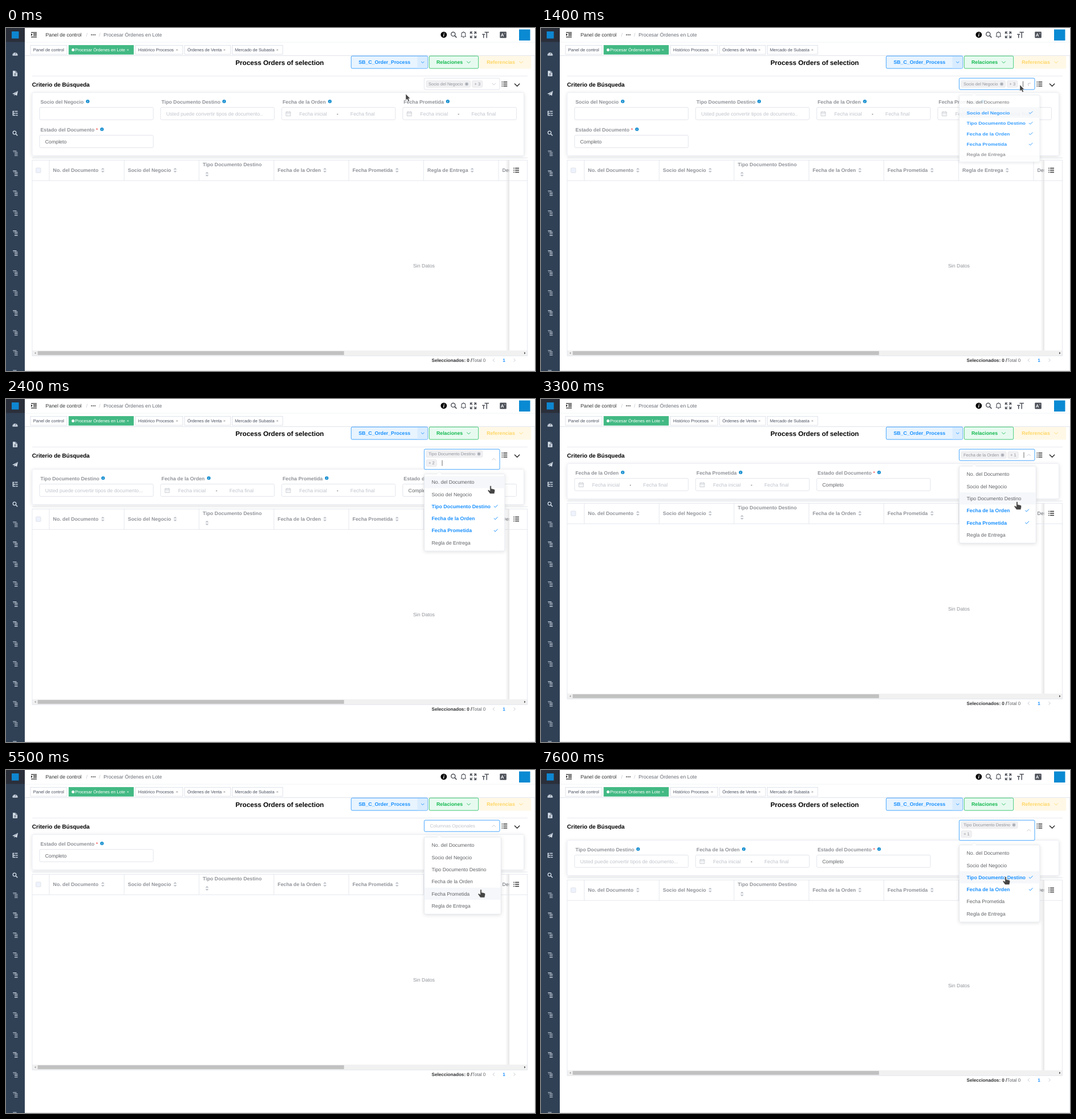
Animation of 929 by 603 pixels, one loop 8 s. Source, as an HTML page:

```html
<!DOCTYPE html>
<html lang="es">
<head>
<meta charset="utf-8">
<title>Procesar Órdenes en Lote</title>
<style>
html, body { margin: 0; width: 100%; height: 100%; overflow: hidden; background: #fff; }
svg { display: block; font-family: "Liberation Sans", Arial, sans-serif; text-rendering: geometricPrecision; }
text { white-space: pre; }
</style>
</head>
<body>
<svg id="stage" width="929" height="603" viewBox="0 0 929 603">
  <defs>
    <filter id="soft" x="-20%" y="-20%" width="140%" height="140%">
      <feDropShadow dx="0" dy="1.2" stdDeviation="3" flood-opacity=".12"/>
    </filter>
    <linearGradient id="edge"><stop offset="0" stop-opacity="0"/><stop offset="1" stop-opacity=".1"/></linearGradient>
    <clipPath id="body"><rect x="46" y="0" width="838" height="603"/></clipPath>
  </defs>
  <g id="fixed"></g>
  <g id="live"></g>
</svg>
<script>
const LOOP = 8000, STEP = 100;
const BLUE = '#1890ff', GREY = '#909399', TEXT = '#606266', PALE = '#c0c4cc', LINE = '#dfe3ea', DARK = '#303133';

// label, tag text width, offset of the info icon
const FIELDS = {
  S: ['Socio del Negocio', 60.5, 83],
  T: ['Tipo Documento Destino', 82, 110],
  O: ['Fecha de la Orden', 62, 83],
  P: ['Fecha Prometida', 57, 77.5],
  E: ['Estado del Documento', 0, 108],
  N: ['No. del Documento'],
  R: ['Regla de Entrega']
};
const SELECTED = [[0, 'STOP'], [2400, 'TOP'], [3300, 'OP'], [3900, 'P'], [4800, ''], [6300, 'O'], [7000, 'TO']];
const CARET = [[1300, 1800], [2400, 3100], [3300, 4500], [4800, 5500], [6000, 6800], [7000, 7600]];
const POINTER = [
  [0, 702, 116], [300, 812, 108], [400, 812, 108], [1000, 841, 100], [1700, 841, 100], [2000, 851, 153],
  [2700, 851, 153], [2900, 838, 182], [3100, 836, 181], [3400, 836, 181], [3700, 837, 200], [4200, 837, 200],
  [4300, 837, 210], [4400, 837, 210], [4600, 836, 214], [5400, 836, 214], [6100, 822, 190], [6500, 822, 190],
  [6800, 818, 175], [7300, 818, 175], [7600, 816, 188], [LOOP, 816, 188]
];

const rect = (x, y, w, h, fill, stroke = 'none', r = 0, more = '') =>
  `<rect x="${x}" y="${y}" width="${w}" height="${h}" rx="${r}" fill="${fill}" stroke="${stroke}" stroke-width=".8" ${more}/>`;
const circle = (x, y, r, fill) => `<circle cx="${x}" cy="${y}" r="${r}" fill="${fill}"/>`;
const stroke = (d, color, w = 1) => `<path d="${d}" fill="none" stroke="${color}" stroke-width="${w}"/>`;
const fill = (d, color, more = '') => `<path d="${d}" fill="${color}" ${more}/>`;
const at = (x, y, body, more = '') => `<g transform="translate(${x} ${y}) ${more}">${body}</g>`;
// y is the middle of the capitals
const text = (x, y, s, color = TEXT, size = 8.75, bold = 0, anchor = 'start') =>
  `<text x="${x}" y="${y + size * .36}" fill="${color}" font-size="${size}" font-weight="${bold ? 700 : 400}" text-anchor="${anchor}">${s}</text>`;
const hline = (x, y, w, color = LINE) => stroke(`M${x} ${y}h${w}`, color, .8);
const chevron = (x, y, color, r = 3, turn = 0, w = .9) =>
  at(x, y, stroke(`M${-r} ${-r / 2}L0 ${r / 2}L${r} ${-r / 2}`, color, w), `rotate(${turn})`);
const info = (x, y, r, color) => circle(x, y, r, color) +
  `<text x="${x}" y="${y + r * .62}" font-family="Liberation Serif, serif" font-style="italic" font-weight="700" font-size="${r * 1.8}" fill="#fff" text-anchor="middle">i</text>`;
const list = (x, y) => stroke([-3.5, 0, 3.5].map(d => `M${x - 4.8} ${y + d}h1.6M${x - 2} ${y + d}h7`).join(''), DARK, 1.3);
const lens = (x, y, r, color, w) => at(x, y, `<circle r="${r}" cx="-1" cy="-1" fill="none" stroke="${color}" stroke-width="${w}"/>` +
  stroke(`M${r * .6 - .8} ${r * .6 - .8}L${r + 1.4} ${r + 1.4}`, color, w * 1.2));

function sidebar() {
  const c = '#d3dce6';
  let s = rect(0, 0, 33, 603, '#304156') + rect(0, 0, 33, 24.5, '#2b2f3a') + rect(10, 6, 12.5, 12.5, '#0e86d0');
  s += at(16, 45, fill('M-4.5 3.5A4.6 4.6 0 1 1 4.5 3.5z', c) + stroke('M0 2L1.2-2M-3 .8h1M2.3 .8h1M-2-1.8l.7.7', '#304156', .8));
  s += at(16, 80, fill('M-4-4.8h5l3 3v6.6h-8z', c) + stroke('M-2 .4h4M-2 2.4h4M1-4.8v3h3', '#304156', .8));
  s += at(16, 115, fill('M-5 .8L5-4.6L3.2 4L-.3 2.3L-1.6 4.4V1.6z', c) + stroke('M-1.6 1.6L3.4-3', '#304156', .6));
  s += at(16, 150, stroke('M-4.5-3.5h3M-.5-3.5h5M-2 0h2.5M1.3 0h3.3M-2 3.5h2.5M1.3 3.5h3.3M-3.6-3V3.5h1.5M-3.6 0h1.5', c, 1.6));
  s += lens(16, 185, 2.8, c, 1.3);
  for (let i = 0; i < 12; i++)
    s += at(16.5, 220.3 + i * 35.07, stroke('M-4.3-4h6.3M-1.5-1.5h5.5M-1.5 1.2h5.5M-1.5 4h5.5M-3.4-1.5h.8', c, 1.1));
  return s;
}

function header() {
  let s = at(49, 11.8, stroke('M-5-4h10M-1-1.3h6M-1 1.3h6M-5 4h10', '#222', 1.3) + fill('M-5-2.2L-2.3 0L-5 2.2z', '#222'));
  s += text(69.5, 12, 'Panel de control', DARK) + text(140.7, 12, '/', PALE) +
    [150.3, 153.3, 156.3].map(x => circle(x, 12, 1.1, '#555')).join('') +
    text(163.2, 12, '/', PALE) + text(171.2, 12, 'Procesar Órdenes en Lote', '#666b73');
  const c = '#4b4f57';
  s += info(768.8, 11.8, 5.4, '#000') + lens(786.3, 11.8, 3.6, c, 1.4);
  s += at(803.4, 11.8, stroke('M-4.6 3.2h9.2M-3.4 3.2V-1a3.4 3.4 0 0 1 6.8 0V3.2M0-5.6v1.2M-1.2 4.9h2.4', c, 1.1));
  s += at(820.5, 12, stroke('M-5-1.5V-5h3.5M1.5-5H5v3.5M5 1.5V5H1.5M-1.5 5H-5V1.5M-4.5-4.5l3 3M4.5-4.5l-3 3M4.5 4.5l-3-3M-4.5 4.5l3-3', c, 1.3));
  s += at(842, 12, stroke('M-1.5-4.4h7.5M2.2-4.4V5.5M-5.8-.8h5M-3.3-.8V5.5', c, 1.5));
  s += rect(867.3, 6.5, 11.5, 11, '#4b4f57', 'none', 1) + text(871.6, 12.5, 'A', '#fff', 8, 1, 'middle') + text(876.2, 9.8, 'x', '#fff', 4.5, 0, 'middle');
  s += rect(901, 2.5, 19.5, 19.5, '#0a8ad2');
  s += hline(33, 25, 896, '#eef0f3') + hline(33, 48.6, 896, '#d8dce5');
  [[43, 64, 'Panel de control'], [110.3, 113.7, 'Procesar Órdenes en Lote', 214], [227.3, 83.3, 'Histórico Procesos', 300.3],
    [313.7, 80.5, 'Órdenes de Venta', 383.5], [397.3, 88.7, 'Mercado de Subasta', 476.5]].forEach(([x, w, label, close], i) => {
    const on = i == 1, color = on ? '#fff' : '#495060';
    s += rect(x, 30.4, w, 15.8, on ? '#42b983' : '#fff', on ? '#42b983' : '#d8dce5') +
      text(x + (on ? 10.9 : 4.8), 38.6, label, color, 7.5);
    if (on) s += circle(117.8, 38.4, 2.5, '#fff');
    if (close) s += stroke(`M${close - 1.3} 37.2l2.6 2.6m0-2.6l-2.6 2.6`, on ? '#fff' : '#777', .7);
  });
  return s;
}

function heading() {
  let s = text(403, 61.2, 'Process Orders of selection', '#000', 11.7, 1);
  s += rect(606.2, 49.2, 134.5, 21.9, '#e8f4ff', BLUE, 2) + rect(722.5, 50, 17.8, 20.4, '#d9ecff') +
    text(619.2, 60, 'SB_C_Order_Process', BLUE, 8.75, 1) + chevron(731.7, 60.2, BLUE, 2.6);
  s += rect(743.2, 49.2, 86.5, 21.9, '#e7faf0', '#13b94e', 2) + text(756, 60.2, 'Relaciones', '#13b94e', 8.75, 1) + chevron(812.5, 60.2, '#13b94e', 3.2);
  s += rect(831.2, 49, 91, 22.4, '#fff8e6', 'none', 2) + text(844.2, 60.2, 'Referencias', '#ffd666', 8.75, 1) + chevron(904.5, 60.2, '#ffd666', 3.2);
  return s + hline(46, 84.4, 870, '#e2e5ea') + text(45.8, 99.6, 'Criterio de Búsqueda', '#000', 10, 1) +
    list(875.3, 98.5) + chevron(897.6, 100, '#222', 4.6, 0, 1.3) +
    hline(33, 602.3, 896, '#d5d8dd') + stroke('M928.6 49V603', '#e6e8ec', .8);
}

function field(key, i, top) {
  const x = 59 + (i % 4) * 212.6, y = top + (i > 3 ? 49 : 0), [label, , icon] = FIELDS[key], mid = y + 20.2;
  let s = text(x + 1.5, y, label, GREY, 8.75, 1) + info(x + 1.5 + icon, y - 1.2, 3.1, '#108ccf') +
    rect(x, y + 9.3, 199.6, 21.8, '#fff', '#dcdfe6', 2);
  if (key == 'E') s += text(x + 99, y, '*', '#f56c6c', 8.75, 1) + text(x + 9.8, mid, 'Completo');
  if (key == 'T') s += text(x + 9.8, mid, 'Usted puede convertir tipos de documento' + (i ? '..' : '...'), PALE);
  if (key == 'O' || key == 'P')
    s += at(x + 11.5, mid + .4, stroke('M-4-3.2h8v7h-8zM-4-1.2h8M-2-4.5v2M2-4.5v2M-2 .6h1M1 .6h1M-2 2.2h1M1 2.2h1', PALE, .8)) +
      text(x + 55, mid, 'Fecha inicial', PALE, 8.75, 0, 'middle') + text(x + 98, mid, '-', DARK, 8.75, 0, 'middle') +
      text(x + 142, mid, 'Fecha final', PALE, 8.75, 0, 'middle');
  return s;
}

function table(y) {
  const sort = (x, y) => fill(`M${x - 3} ${y - 1}l3-3.2l3 3.2zM${x - 3} ${y + 1}l3 3.2l3-3.2z`, PALE);
  let cells = '';
  [['N', 170], ['S', 297], ['T', 353], ['O', 560], ['P', 686.7], ['R', 818.7]].forEach(([k, icon], i) => {
    const x = 76 + i * 131.5, tall = k == 'T';
    cells += text(x + 6.6, y + (tall ? 7.6 : 18), FIELDS[k][0], GREY, 8.75, 1) + sort(icon, y + (tall ? 25 : 18)) + stroke(`M${x} ${y}v36`, LINE, .8);
  });
  cells += stroke(`M865 ${y}v36`, LINE, .8) + text(871.5, y + 18, 'Descripción', GREY, 8.75, 1) +
    rect(52.6, y + 14, 8.4, 8.4, '#edf2fc', '#dcdfe6', 1);
  const bar = y + 339.5;
  return hline(46, y - 3.7, 870, '#dde1e8') + `<g clip-path="url(#body)">${cells}</g>` +
    rect(877, y, 7, 335, 'url(#edge)') + rect(884, y, 32, 335, '#fff') +
    list(896, y + 18) + hline(46, y + 36.4, 870) + text(734, y + 186, 'Sin Datos', GREY, 8.75, 0, 'middle') +
    rect(46, bar - 4.6, 870, 9.2, '#f1f1f1') + rect(55.6, bar - 3.4, 538, 6.8, '#c1c1c1') +
    fill(`M52.5 ${bar - 2}v4l-2.5-2z`, '#a3a3a3') + fill(`M910 ${bar - 2}v4l2.5-2z`, '#505050') +
    rect(46, y + .3, 869.6, 344, 'none', LINE) +
    `<text x="747.6" y="${y + 354.7}" font-size="8.125" fill="${TEXT}"><tspan font-weight="700" fill="${DARK}">Seleccionados: 0 /</tspan>Total 0</text>` +
    chevron(856.5, y + 352, PALE, 2.8, 90) + text(874.6, y + 352, '1', BLUE, 8.125, 1, 'middle') + chevron(893, y + 352, PALE, 2.8, -90);
}

function picker(sel, tall, t) {
  const y = tall ? 96.6 : 98.5, open = t >= 1300, u = Math.min(1, Math.max(0, (t - 1300) / 300));
  let caret = [744.5, y];
  let s = rect(734.4, 88.2, 132.6, tall ? 35.6 : 20, '#fff', open ? BLUE : t >= 300 ? PALE : '#dcdfe6', 2);
  const tag = (x, y, w, label) => rect(x, y - 5.8, w, 11.6, '#f1f1f3', '#e6e6e9', 2) + text(x + 4, y, label, GREY, 7.5);
  if (sel) {
    const [label, w] = FIELDS[sel[0]], c = 742 + w + 6.5;
    s += tag(738, y, w + 17, label) + circle(c, y, 3.1, PALE) + stroke(`M${c - 1.2} ${y - 1.2}l2.4 2.4m0-2.4l-2.4 2.4`, '#777', .7);
    caret = [764.5 + w, y];
    if (sel.length > 1) {
      const [mx, my] = tall ? [738, 112.6] : [758 + w, y];
      s += tag(mx, my, 18.3, '+ ' + (sel.length - 1));
      caret = [mx + 28, my];
    }
  } else s += text(744.5, 98.5, 'Columnas Opcionales', PALE, 8.125);
  if (CARET.some(([a, b]) => t >= a && t < b)) s += stroke(`M${caret[0]} ${caret[1] - 5}v10`, '#444', .8);
  return s + chevron(856.7, tall ? 106 : 98.5, PALE, 3.2, 180 * (1 - (1 - u) ** 3));
}

function menu(sel, tall, t, hand) {
  const u = Math.min(1, (t - 1300) / 300);
  if (u <= 0) return '';
  const top = tall ? 131.8 : 118, row = 21.27, w = sel.includes('T') ? 141.4 : 134.8;
  const hover = hand && hand[1] > top ? Math.floor((hand[1] - top - 3.6) / row) : 1;
  let s = rect(0, 0, w, 135.4, '#fff', '#e0e4ea', 2, 'filter="url(#soft)"') +
    fill('M22 .5L26.3-3.6L30.6 .5z', '#fff') + stroke('M22 0L26.3-3.9L30.6 0', '#e8ebf0', .6);
  [...'NSTOPR'].forEach((k, i) => {
    const mid = 14.3 + i * row, on = sel.includes(k);
    if (i == hover) s += rect(.4, mid - row / 2, w - .8, row, '#f5f7fa');
    s += text(13, mid, FIELDS[k][0], on ? BLUE : TEXT, 8.75, on);
    if (on) s += stroke(`M${w - 19} ${mid - .3}l2.3 2.2l4.3-4.4`, BLUE, 1);
  });
  const k = 1 - (1 - u) ** 5;
  return `<g opacity="${k}">` + at(734.5, top, s, `scale(1 ${k})`) + '</g>';
}

function pointer(t) {
  const i = POINTER.findIndex(p => p[0] > t), [a, x, y] = POINTER[i - 1], [b, X, Y] = POINTER[i], u = (t - a) / (b - a);
  return [x + (X - x) * u, y + (Y - y) * u];
}

function scene(t) {
  const sel = SELECTED.filter(s => s[0] <= t).pop()[1], tall = sel[0] == 'T';
  const shift = tall ? 10 : 0, extra = sel.length > 3 ? 49 : 0, tip = pointer(t), hand = t >= 1800;
  const shape = hand
    ? fill('M-1.2 0Q0-1.2 1.2 0V4.6L6 5.6Q8 6.2 7.6 8.4L6.6 13.6H-1L-5 8Q-5 6-3 7L-1.2 8.4z', '#444', 'stroke="#fff" stroke-width=".5"')
    : fill('M0 0V11L2.4 8.8L4.4 12.8L6.5 11.8L4.6 8H7.8z', '#444', 'stroke="#fff" stroke-width=".4"');
  return rect(46, 113.6 + shift, 863.5, 62 + extra, '#fff', '#e6eaf0', 2.5, 'filter="url(#soft)"') +
    [...sel + 'E'].map((k, i) => field(k, i, 130.2 + shift)).join('') + table(183 + shift + extra) +
    picker(sel, tall, t) + menu(sel, tall, t, hand && tip) + at(tip[0], tip[1], shape);
}

const live = document.getElementById('live');
document.getElementById('fixed').innerHTML = sidebar() + header() + heading();
let last = -1;
function frame() {
  const t = Math.floor(performance.now() % LOOP / STEP) * STEP;
  if (t != last) live.innerHTML = scene(last = t);
  requestAnimationFrame(frame);
}
frame();
</script>
</body>
</html>
```
